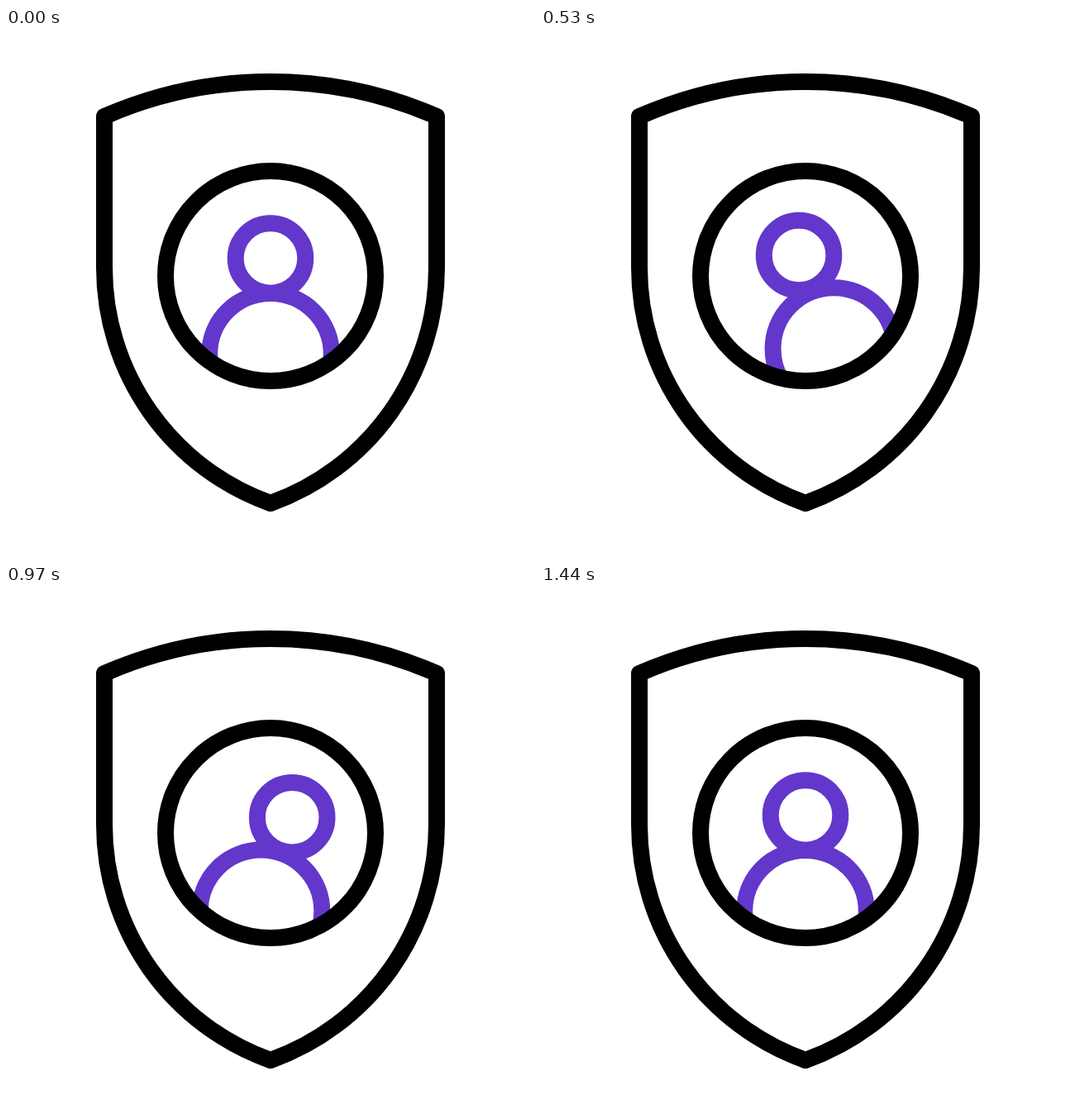
Animation, 640 px wide and 640 px high, one loop 1640 ms. Source, as an HTML page:

```html
<!DOCTYPE html>
<html lang="en">
<head>
<meta charset="utf-8">
<title>Shield with person</title>
<style>
  html, body { margin: 0; width: 100%; height: 100%; overflow: hidden; background: #fff; }
  svg { display: block; width: 100%; height: 100%; }
</style>
</head>
<body>
<svg viewBox="0 0 640 640" fill="none" stroke-width="20" stroke-linejoin="round">
  <clipPath id="lens"><circle cx="320" cy="300" r="120"/></clipPath>
  <g clip-path="url(#lens)" stroke="#6337cb">
    <circle id="body" cx="320" cy="394.7" r="73.8"/>
    <circle id="head" cx="320" cy="278.5" r="42.3"/>
  </g>
  <g stroke="#000">
    <circle cx="320" cy="300" r="127"/>
    <path d="M119 107A502 502 0 0 1 521 107V290A302.6 302.6 0 0 1 320 575A302.6 302.6 0 0 1 119 290Z"/>
  </g>
</svg>
<script>
  const LOOP = 1640, STEP = 33.4, LAST = 43;
  const head = document.getElementById('head');
  const body = document.getElementById('body');

  // Keys: [step, dx, dy, lift], lift bows the path leading to that key upwards.
  const headKeys = [[0, 0, 0, 0], [10, -41, 6.5, 0], [24, 44, 4.5, 9.7], [35.4, 0, 0, 0]];
  const bodyKeys = [[0, 0, 0, 0], [14, 39, -7.3, 0], [25, -19.7, -0.4, 0], [37.2, 14, 0, 0], [LAST, 0, 0, 0]];

  const ease = u => (1 - Math.cos(Math.PI * u)) / 2;
  const mix = (a, b, p) => a + (b - a) * p;

  function offset(keys, n) {
    const i = keys.findIndex(k => k[0] > n);
    if (i < 0) return [0, 0];
    const a = keys[i - 1], b = keys[i];
    const p = ease((n - a[0]) / (b[0] - a[0]));
    return [mix(a[1], b[1], p), mix(a[2], b[2], p) - b[3] * 4 * p * (1 - p)];
  }

  function place(el, keys, n) {
    const [x, y] = offset(keys, n);
    el.setAttribute('transform', `translate(${x.toFixed(2)} ${y.toFixed(2)})`);
  }

  function draw(ms) {
    const n = Math.min(LAST, Math.floor((ms % LOOP + 5) / STEP));
    place(head, headKeys, n);
    place(body, bodyKeys, n);
  }

  let start;
  function tick(now) {
    start ??= now;
    draw(now - start);
    requestAnimationFrame(tick);
  }
  draw(0);
  requestAnimationFrame(tick);
</script>
</body>
</html>
```
